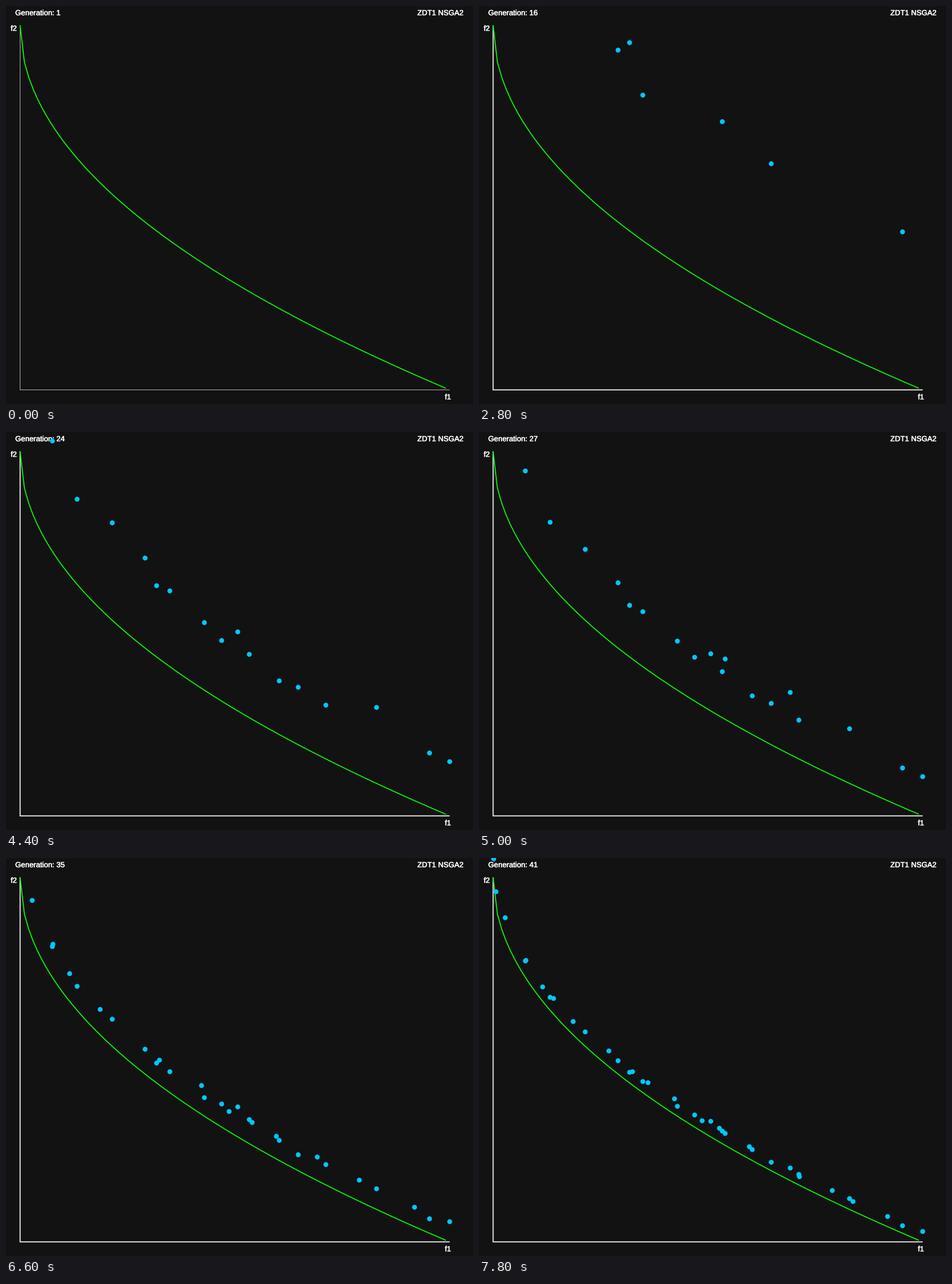
Animation of 811 by 690 pixels, one loop 8 s. Source, as a matplotlib script:

```python
import random

import matplotlib.pyplot as plt
import numpy as np
from matplotlib.animation import FuncAnimation
from matplotlib.patheffects import withStroke

W, H, DPI = 811, 690, 100
PX = 72 / DPI
FRAMES, STEP_MS = 40, 200
X0, Y0, SX, SY = 24.5, 665.5, 746, 631.5
CYAN, GREEN, BACK = "#00c8ff", "#00ff00", "#121212"

# Stage x of the first solutions, in order of birth; later ones are spread out
FOUNDERS = [735, 284, 422, 261, 507, 241, 643, 80, 184, 555, 770, 123,
            344, 474, 374, 402, 427, 540]
SIZE, GOLDEN = 38, 0.618


def zdt1(f1, g=1):
    return g - np.sqrt(g * f1)


def to_stage(f1, f2):
    return X0 + SX * f1, Y0 - SY * f2


rng = random.Random(4)
genes = [(x - X0) / SX for x in FOUNDERS]
genes += [(i * GOLDEN % 1) ** 1.5 for i in range(SIZE - len(genes))]
genes = np.clip(genes, 0, 1)
quality = np.array([rng.uniform(0.8, 1.2) for _ in genes])
phase = np.array([rng.randrange(3) for _ in genes])


def population(gen):
    """Each solution keeps its f1 and drops towards the front in steps."""
    count = max(0, round(1.2 * (gen - 11)))
    last_drop = gen - (gen + phase) % 3
    g = 1 + 0.98 * quality * np.exp(-0.105 * (last_drop - 12))
    points = np.column_stack(to_stage(genes, zdt1(genes, g)))
    return points[:count]


plt.rcParams["font.family"] = "Liberation Sans"
plt.rcParams["text.hinting"] = "none"

fig = plt.figure(figsize=(W / DPI, H / DPI), dpi=DPI, facecolor=BACK)
ax = fig.add_axes([0, 0, 1, 1])
ax.set(xlim=(0, W), ylim=(H, 0))
ax.axis("off")


def label(x, y, text, ha="left"):
    weight = withStroke(linewidth=0.5 * PX, foreground="white")
    return ax.text(x, y, text, ha=ha, va="baseline", color="white",
                   fontsize=13 * PX, zorder=3, path_effects=[weight])


axes_line, = ax.plot([X0, X0, X0 + SX], [Y0 - SY, Y0, Y0],
                     solid_joinstyle="miter", solid_capstyle="butt",
                     snap=False, zorder=1)
f1 = np.arange(100) / 100
ax.plot(*to_stage(f1, zdt1(f1)), color=GREEN, lw=1.75 * PX,
        snap=False, zorder=2)

counter = label(16, 16, "")
label(794.5, 16, "ZDT1 NSGA2", "right")
label(8, 43, "f2")
label(762, 682, "f1")
dots = ax.scatter([], [], s=(8.5 * PX) ** 2, color=CYAN, linewidths=0, zorder=4)


def draw(i):
    gen = i + 2 if i else 1
    counter.set_text(f"Generation: {gen}")
    dots.set_offsets(population(gen))
    # The axes brighten and thicken over the first few generations
    strength = 1 - 0.32 ** i
    axes_line.set_color((0.7 + 0.3 * strength,) * 3)
    axes_line.set_linewidth((1 + 0.7 * strength) * PX)
    return counter, dots, axes_line


anim = FuncAnimation(fig, draw, frames=FRAMES, interval=STEP_MS,
                     repeat=True, repeat_delay=0, blit=False)
plt.show()
```
